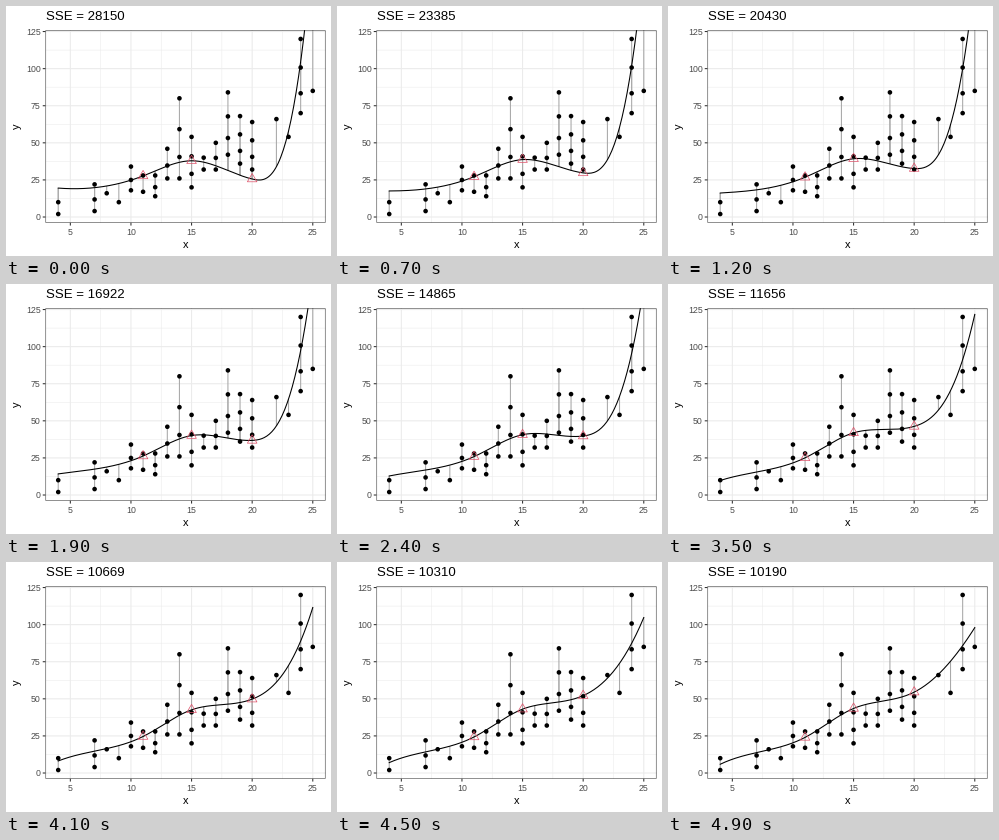
A matplotlib script for the animation above (5000 ms loop, 325x250 px).

```python
import matplotlib.pyplot as plt
import numpy as np
from matplotlib.animation import FuncAnimation
from matplotlib.collections import PolyCollection
from matplotlib.patches import Ellipse, Rectangle

WIDTH, HEIGHT, DPI = 325, 250, 100
PX = 72 / DPI  # points per pixel
FRAMES, INTERVAL = 50, 100
LEFT, RIGHT, TOP, BOTTOM = 39.5, 319.5, 24.2, 216.8
XLIM, YLIM = (2.95, 26.05), (-3.9, 125.9)
X_UNIT = (XLIM[1] - XLIM[0]) / (RIGHT - LEFT)  # data units per pixel
Y_UNIT = (YLIM[1] - YLIM[0]) / (BOTTOM - TOP)
LINE = 1.07 * PX
SSE_START, SSE_END = 28150, 10190

plt.rcParams["font.family"] = "Liberation Sans"


def make_points():
    """One column per speed, spread between its shortest and longest stop."""
    speeds = [4, *range(7, 21), *range(22, 26)]
    low = [2, 4, 16, 10, 18, 17, 14, 26, 26, 20, 32, 32, 42, 36, 32, 66, 54, 70, 85]
    high = [10, 22, 16, 10, 34, 28, 28, 46, 80, 54, 40, 50, 84, 68, 64, 66, 54, 120, 85]
    points = []
    for speed, a, b in zip(speeds, low, high):
        count = min(4, 1 + int(np.ceil((b - a) / 11)))
        for t in np.linspace(0, 1, count):
            points.append((speed, a + (b - a) * t**1.2))
    return np.array(points, float).T


knots = np.array([11, 15, 20])


def basis(values):
    """Cubic spline basis in truncated powers."""
    u = (np.asarray(values, float) - 15) / 10
    powers = [u**k for k in range(4)]
    hinges = [np.clip(u - (k - 15) / 10, 0, None) ** 3 for k in knots]
    return np.column_stack(powers + hinges)


def spline_through(heights):
    return np.linalg.solve(basis([4, 8, 11, 15, 17.5, 20, 25]), heights)


x, y = make_points()
grid = np.linspace(4, 25, 200)
B_DATA, B_GRID, B_KNOTS = basis(x), basis(grid), basis(knots)
first = spline_through([19.5, 20.9, 27.7, 37.9, 33.0, 25.6, 181])
best = spline_through([5.9, 15.6, 24, 43.5, 48.6, 54.5, 98])

fig = plt.figure(figsize=(WIDTH / DPI, HEIGHT / DPI), dpi=DPI, facecolor="white")
ax = fig.add_axes([LEFT / WIDTH, 1 - BOTTOM / HEIGHT,
                   (RIGHT - LEFT) / WIDTH, (BOTTOM - TOP) / HEIGHT])
ax.set(xlim=XLIM, ylim=YLIM)
ax.axis("off")

# Overlay in pixel coordinates for the frame, ticks and text
stage = fig.add_axes([0, 0, 1, 1])
stage.set(xlim=(0, WIDTH), ylim=(HEIGHT, 0))
stage.axis("off")


def label(px, py, text, size, **style):
    style = {"va": "baseline", "ha": "center", **style}
    return stage.text(px, py, text, fontsize=size * PX, **style)


def tick(xs, ys):
    stage.plot(xs, ys, color="#333333", lw=LINE, solid_capstyle="butt", snap=False)


def gridlines(xs, ys, width):
    style = dict(color="#ebebeb", lw=width, snap=False, zorder=0)
    for v in xs:
        ax.axvline(v, **style)
    for v in ys:
        ax.axhline(v, **style)


x_ticks, y_ticks = np.arange(5, 26, 5), np.arange(0, 126, 25)
gridlines(x_ticks[:-1] + 2.5, y_ticks[:-1] + 12.5, LINE / 2)
gridlines(x_ticks, y_ticks, LINE)

for v in x_ticks:
    px = LEFT + (v - XLIM[0]) / X_UNIT
    tick((px, px), (BOTTOM, BOTTOM + 2.75))
    label(px, 229.2, str(v), 8.8, color="#4d4d4d")
for v in y_ticks:
    py = BOTTOM - (v - YLIM[0]) / Y_UNIT
    tick((LEFT - 2.75, LEFT), (py, py))
    label(34.6, py + 3.15, str(v), 8.8, ha="right", color="#4d4d4d")

label((LEFT + RIGHT) / 2, 242.2, "x", 11)
label(15.6, (TOP + BOTTOM) / 2, "y", 11, rotation=90, ha="right", va="center")
title = label(LEFT, 14.3, "", 13.2, ha="left")

# Only the inner half of the border line is visible
inset = 0.27
stage.add_patch(Rectangle((LEFT + inset, TOP + inset), RIGHT - LEFT - 2 * inset,
                          BOTTOM - TOP - 2 * inset, fill=False, ec="#333333",
                          lw=LINE / 2, snap=False))

residuals = ax.vlines(x, y, y, color="#a9a9a9", lw=LINE, zorder=2)
residuals.set_snap(False)
for point in zip(x, y):
    ax.add_patch(Ellipse(point, 4.6 * X_UNIT, 4.6 * Y_UNIT, fc="black", lw=0, zorder=3))
curve, = ax.plot([], [], color="black", lw=LINE, snap=False, zorder=4)

angles = np.radians([90, 210, 330])
triangle = 5.53 * np.column_stack([np.cos(angles) * X_UNIT, np.sin(angles) * Y_UNIT])
triangles = PolyCollection([triangle], facecolors="none", edgecolors="#df536b",
                           linewidths=0.71 * PX, snap=False, zorder=5)
ax.add_collection(triangles, autolim=False)


def update(frame):
    left = 1 - frame / (FRAMES - 1)
    coef = best + left * (first - best)
    residuals.set_segments([[(a, b), (a, c)] for a, b, c in zip(x, y, B_DATA @ coef)])
    curve.set_data(grid, B_GRID @ coef)
    triangles.set_verts([triangle + center for center in zip(knots, B_KNOTS @ coef)])
    title.set_text(f"SSE = {SSE_END + (SSE_START - SSE_END) * left**2:.0f}")
    return residuals, curve, triangles, title


anim = FuncAnimation(fig, update, frames=FRAMES, interval=INTERVAL,
                     repeat=True, repeat_delay=0, blit=False)
plt.show()
```
